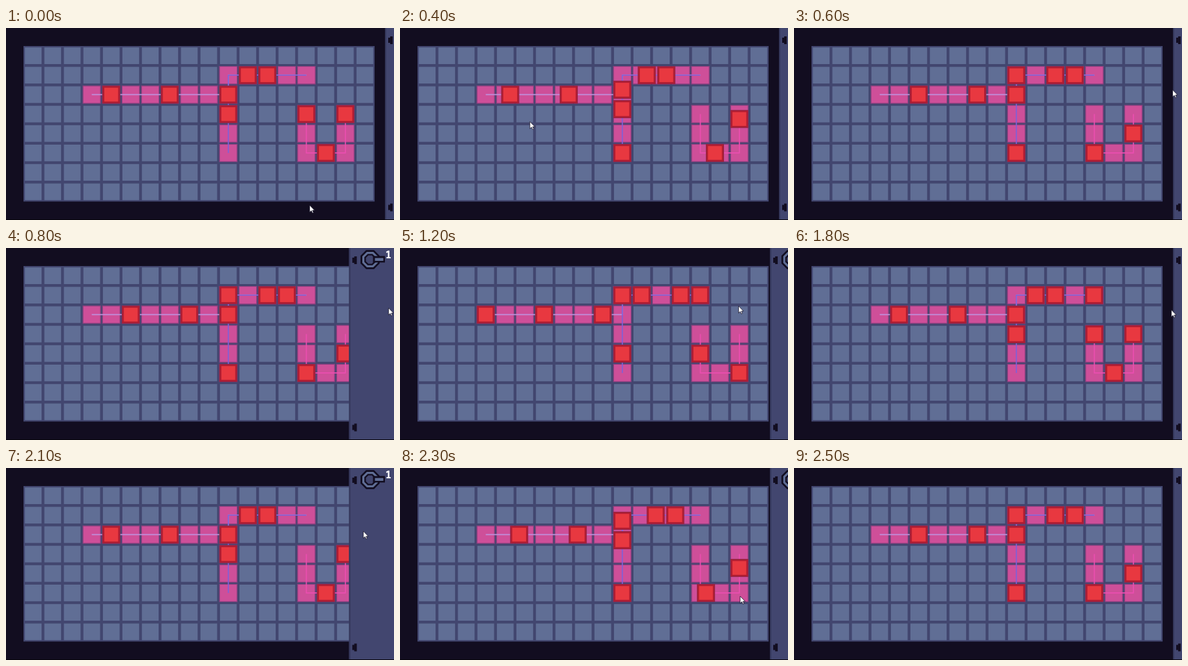
An HTML page with a canvas that plays this animation: 600x298 px, repeating every 2.8 s.

```html
<!DOCTYPE html>
<html lang="en">
<head>
<meta charset="utf-8">
<title>Conveyor grid</title>
<style>
html, body { margin: 0; width: 100%; height: 100%; overflow: hidden; background: #120d20; }
canvas { display: block; }
</style>
</head>
<body>
<canvas id="stage" width="600" height="298"></canvas>
<script>
const ctx = document.getElementById('stage').getContext('2d');
const LOOP = 2800, TICK = 100, LAST = 2500;
const LEFT = 27, TOP = 28, PITCH = 30.17, COLS = 18, ROWS = 8;
const FIRST = 10, STEP = 606, SLIDE = 250;
const DARK = '#120d20', PANEL = '#42466f', CELL = '#606e95';

// Expand corner points into one [col, row] per grid cell.
function route(...corners) {
  const cells = [corners[0]];
  for (const [cx, cy] of corners.slice(1)) {
    let [x, y] = cells[cells.length - 1];
    while (x !== cx || y !== cy) {
      x += Math.sign(cx - x);
      y += Math.sign(cy - y);
      cells.push([x, y]);
    }
  }
  return cells;
}

// Every third cell of a belt carries a block; phase is the first one at step 0.
const belts = [
  { cells: route([3, 2], [10, 2], [10, 1], [14, 1]), phase: 1, color: '#c08fdb' },
  { cells: route([10, 5], [10, 1], [14, 1]), phase: 2, color: '#7f60d8', exitFrom: 1 },
  { cells: route([16, 3], [16, 5], [14, 5], [14, 3]), phase: 0, color: '#ea4eb0' }
];

// Time, x, y of the pointer's turning points.
const cursorKeys = [[0, 470, 275], [300, 9, 170], [600, 586, 96], [800, 592, 93],
  [1200, 524, 90], [1800, 584, 96], [2100, 553, 98], [2500, 500, 300]];

const clamp = v => Math.min(1, Math.max(0, v));
const center = ([col, row]) => [LEFT + (col + 0.5) * PITCH, TOP + (row + 0.5) * PITCH];

function square([x, y], size, color) {
  ctx.fillStyle = color;
  ctx.fillRect(x - size / 2, y - size / 2, size, size);
}

function trace(points, close) {
  ctx.beginPath();
  points.forEach(p => ctx.lineTo(...p));
  if (close) ctx.closePath();
}

function stroke(points, width, color) {
  trace(points);
  ctx.lineWidth = width;
  ctx.strokeStyle = color;
  ctx.stroke();
}

function octagon(x, y, r, color) {
  const corner = i => (i + 0.5) * Math.PI / 4;
  trace(Array.from({ length: 8 }, (_, i) =>
    [x + r * Math.cos(corner(i)), y + r * Math.sin(corner(i))]), true);
  ctx.fillStyle = color;
  ctx.fill();
}

function drawGrid() {
  ctx.fillStyle = PANEL;
  ctx.fillRect(LEFT, TOP, COLS * PITCH, ROWS * PITCH);
  for (let row = 0; row < ROWS; row++)
    for (let col = 0; col < COLS; col++) square(center([col, row]), 25.8, CELL);
  const paved = belts.flatMap(b => b.cells).map(center);
  for (const at of paved) square(at, 28.5, '#85407d');
  for (const at of paved) square(at, 25.8, '#ce4f99');
  for (const { cells, color } of belts) stroke(cells.map(center), 1.7, color);
}

function drawBlocks(t) {
  const step = Math.floor((t - FIRST + SLIDE) / STEP);
  const left = clamp((FIRST + step * STEP - t) / SLIDE);
  const lag = left * left;
  for (const { cells, phase, exitFrom } of belts) {
    const end = cells.length - 1;
    for (let i = (step + phase) % 3; i <= end; i += 3) {
      if (i === end && (left === 0 || step < exitFrom)) continue;
      const to = cells[i], from = cells[Math.max(0, i - 1)];
      const at = center(to.map((v, k) => v + (from[k] - v) * lag));
      square(at, 28, '#8f2648');
      square(at, 26, '#b01d32');
      square(at, 21.4, '#e83840');
    }
  }
}

function drawWrench() {
  octagon(32.5, 18, 16, DARK);
  ctx.fillStyle = DARK;
  ctx.fillRect(40, 12.5, 15.5, 10);
  octagon(32.5, 18, 13, CELL);
  octagon(32.5, 18, 9.5, DARK);
  octagon(32.5, 18, 7, PANEL);
  ctx.fillStyle = DARK;
  ctx.fillRect(37, 12.5, 10, 10);
  ctx.fillStyle = CELL;
  ctx.fillRect(40, 15.5, 13, 4.5);
}

function drawPanel(t) {
  const open = (from, to) => clamp(Math.min(t - from, to - t) / 200) ** 2;
  ctx.save();
  ctx.translate(586 - 55.5 * (open(600, 1300) + open(1800, 2400)), 0);
  ctx.fillStyle = PANEL;
  ctx.fillRect(0, 0, 72, 298);
  ctx.fillStyle = '#34375b';
  ctx.fillRect(0, 0, 2, 298);
  ctx.fillStyle = DARK;
  for (const y of [19, 278.5]) {
    ctx.fillRect(5, y - 4, 4, 8);
    ctx.fillRect(8, y - 6, 4, 12);
  }
  drawWrench();
  ctx.fillStyle = '#fff';
  ctx.font = 'bold 16px "Noto Sans Mono", monospace';
  ctx.fillText('1', 56, 15.5);
  ctx.restore();
}

function drawCursor(t) {
  const n = cursorKeys.findIndex(k => k[0] > t);
  if (n < 0) return;
  const a = cursorKeys[n - 1], b = cursorKeys[n], p = (t - a[0]) / (b[0] - a[0]);
  ctx.save();
  ctx.translate(a[1] + (b[1] - a[1]) * p - 0.5, a[2] + (b[2] - a[2]) * p);
  trace([[0, 0], [0, 11], [2.6, 8.6], [4.3, 12.3], [6, 11.5], [4.4, 8], [7.8, 8]], true);
  ctx.fillStyle = '#fff';
  ctx.fill();
  ctx.lineWidth = 0.8;
  ctx.strokeStyle = '#17152a';
  ctx.stroke();
  ctx.restore();
}

function draw(now) {
  const t = Math.min(LAST, Math.floor(now % LOOP / TICK) * TICK);
  ctx.fillStyle = DARK;
  ctx.fillRect(0, 0, 600, 298);
  drawGrid();
  drawBlocks(t);
  drawPanel(t);
  ctx.fillStyle = '#05030a';
  ctx.fillRect(0, 297, 600, 1);
  drawCursor(t);
}

const start = performance.now();
function frame() {
  draw(performance.now() - start);
  requestAnimationFrame(frame);
}
frame();
</script>
</body>
</html>
```
